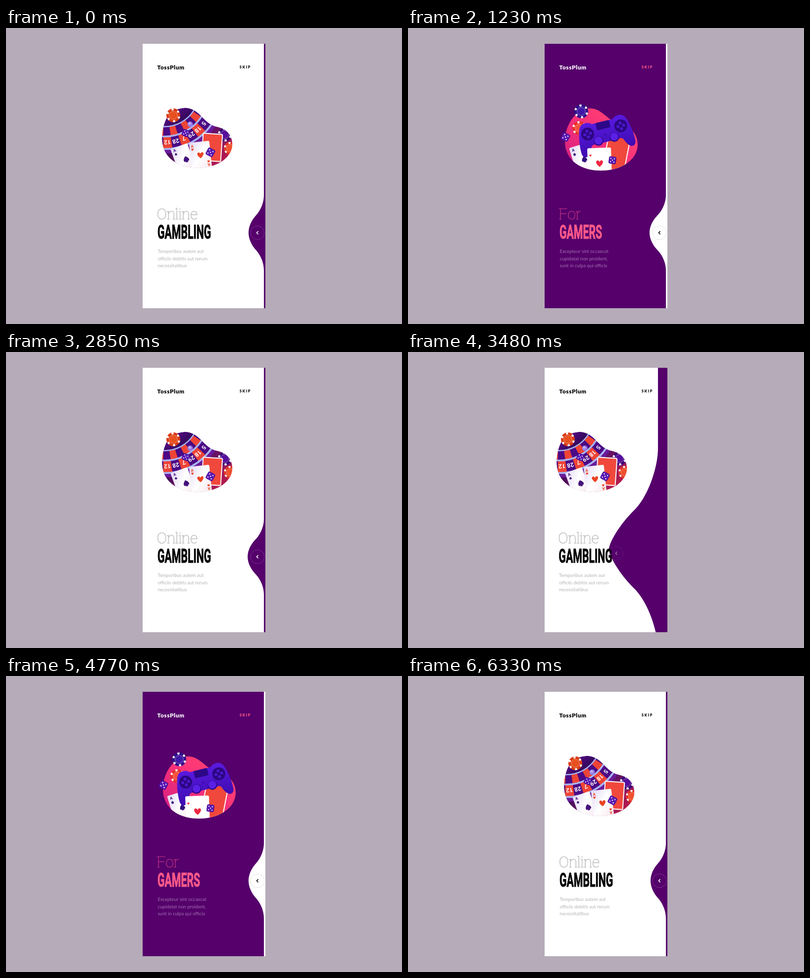
Animation, 800 px wide and 600 px high, one loop 6.36 s. Source, as an HTML page:

```html
<!DOCTYPE html>
<html lang="en">
<head>
<meta charset="utf-8">
<title>Onboarding swipe</title>
<style>
  html, body { margin: 0; width: 100%; height: 100%; overflow: hidden; background: #b6abb8; }
  svg { display: block; width: 800px; height: 600px; }
  .brand { font: 900 11.8px Lato, sans-serif; letter-spacing: .6px; }
  .skip { font: 900 7.2px Lato, sans-serif; letter-spacing: 1.8px; }
  .intro { font: 200 31px Roboto, sans-serif; stroke-width: .5px; }
  .title { font: 700 39.4px Roboto, sans-serif; }
  .body { font: 400 9.5px Lato, sans-serif; }
  .mark { font: 700 12px Roboto, sans-serif; text-anchor: middle; }
</style>
</head>
<body>
<svg viewBox="0 0 800 600">
  <defs>
    <clipPath id="card"><rect x="276" y="32" width="248" height="536"/></clipPath>
    <clipPath id="waveClip"><path id="waveClipPath"/></clipPath>
    <linearGradient id="night" x1="0" y1="0" x2="1" y2="1">
      <stop offset="0" stop-color="#6a0fa0"/><stop offset=".3" stop-color="#2a0650"/><stop offset=".65" stop-color="#7a1468"/><stop offset="1" stop-color="#d8203c"/>
    </linearGradient>
    <linearGradient id="rose" x1="0" y1="1" x2="1" y2="0">
      <stop offset="0" stop-color="#d01c84"/><stop offset=".55" stop-color="#fb3478"/><stop offset="1" stop-color="#ff4a70"/>
    </linearGradient>
    <linearGradient id="paper" x1="0" y1="0" x2="1" y2="1">
      <stop offset="0" stop-color="#e2d8f6"/><stop offset=".5" stop-color="#fff"/><stop offset="1" stop-color="#f6e6ee"/>
    </linearGradient>
    <linearGradient id="violet" x1="0" y1="0" x2="0" y2="1">
      <stop offset="0" stop-color="#5a1ae0"/><stop offset="1" stop-color="#3d0bb0"/>
    </linearGradient>
    <pattern id="weave" width="3" height="3" patternUnits="userSpaceOnUse">
      <rect width="3" height="3" fill="#ee3c34"/><circle cx="1.5" cy="1.5" r=".65" fill="#ff8a68"/>
    </pattern>
  </defs>
  <rect width="800" height="600" fill="#b6abb8"/>
  <g clip-path="url(#card)">
    <rect id="base" x="276" y="32" width="248" height="536"/>
    <use id="oldArt"/>
    <path id="wave"/>
    <g clip-path="url(#waveClip)"><use id="newArt"/></g>
    <path id="bulge"/>
    <g id="copy"></g>
    <text id="brand" class="brand" x="305.5" y="84"><tspan>Toss</tspan><tspan>Plum</tspan></text>
    <text id="skip" class="skip" x="472" y="82.4">SKIP</text>
    <g id="button" fill="none">
      <circle r="14"/>
      <path d="M1.6 -3.2L-1.6 0L1.6 3.2" stroke-width="1.5"/>
    </g>
  </g>
</svg>
<script>
const HALF = 1590;
const SWAP = 440;
const $ = id => document.getElementById(id);
const clamp = v => Math.max(0, Math.min(1, v));

const pages = [
  { bg: '#ffffff', ink: '#000000', skip: '#000000', title: '#000000', intro: '#b8b8b8', body: '#b4b4b4', ring: '#e4e4e4',
    words: ['Online', 'GAMBLING'], lines: ['Temporibus autem aut', 'officiis debitis aut rerum', 'necessitatibus'] },
  { bg: '#55006b', ink: '#ffffff', skip: '#ff5a8a', title: '#ff5a8a', intro: '#b92f82', body: '#a070b0', ring: '#7a3090',
    words: ['For', 'GAMERS'], lines: ['Excepteur sint occaecat', 'cupidatat non proident,', 'sunt in culpa qui officia'] }
];

// Smooth curve through [time, value] pairs, flat at turning points
function track(...keys) {
  const slope = i => (keys[i + 1][1] - keys[i][1]) / (keys[i + 1][0] - keys[i][0]);
  const tangent = i => {
    if (i === 0 || i === keys.length - 1) return 0;
    const a = slope(i - 1), b = slope(i);
    return a * b <= 0 ? 0 : 2 * a * b / (a + b);
  };
  return t => {
    if (t <= keys[0][0]) return keys[0][1];
    const i = keys.findIndex(k => k[0] > t) - 1;
    if (i < 0) return keys[keys.length - 1][1];
    const [t0, v0] = keys[i], [t1, v1] = keys[i + 1], d = t1 - t0, u = (t - t0) / d;
    return v0 + (v1 - v0) * u * u * (3 - 2 * u)
      + d * u * (1 - u) * (tangent(i) * (1 - u) - tangent(i + 1) * u);
  };
}

const motion = {
  side: track([0, 521], [120, 520], [300, 505], [380, 475], [480, 420], [570, 368], [660, 323], [740, 291], [810, 277], [860, 276]),
  tip: track([0, 490], [120, 478], [200, 455], [300, 406], [380, 335], [450, 272], [540, 260], [660, 272], [740, 282], [810, 283], [950, 276]),
  spread: track([0, 76], [120, 100], [300, 205], [450, 210], [660, 188], [810, 130]),
  centerY: track([0, 415], [300, 400], [480, 404], [660, 407], [810, 395]),
  nextSide: track([480, 524.5], [660, 522.5], [860, 521]),
  nextTip: track([480, 524.5], [660, 518.5], [810, 512], [950, 497], [1080, 487.5], [1230, 488], [1500, 490]),
  nextSpread: track([480, 40], [660, 45], [810, 54], [1080, 76]),
  oldX: track([0, 0], [120, -2], [300, -15], [450, -80], [560, -180], [640, -240]),
  newX: track([360, 240], [520, 130], [660, 48], [760, 10], [810, .5], [900, 0]),
  newScale: track([360, .76], [520, .82], [660, .91], [810, 1.05], [1000, 1.02], [1230, 1]),
  textX: track([0, 0], [120, 0], [300, -1.5], [440, -12], [560, -9], [660, -4], [810, -.3], [900, 0])
};

function wavePath(side, tip, cy, spread) {
  const s = clamp((spread - 76) / 112);
  const mid = .47 - .09 * s, blunt = .17 - .11 * s, steep = .335 - .1 * s;
  const pt = (f, k) => `${(side + (tip - side) * f).toFixed(2)} ${(cy + k * spread).toFixed(2)}`;
  return `M530 0H${side}L${pt(0, -1)}`
    + `C${pt(0, -.8)} ${pt(.22, -mid - .125)} ${pt(.5, -mid)}C${pt(.8, -steep)} ${pt(1, -blunt)} ${pt(1, 0)}`
    + `C${pt(1, blunt)} ${pt(.8, steep)} ${pt(.5, mid)}C${pt(.22, mid + .125)} ${pt(0, .8)} ${pt(0, 1)}`
    + `L${side} ${Math.max(600, cy + spread)}H530Z`;
}

function mix(a, b, k) {
  const part = (c, i) => parseInt(c.slice(1 + 2 * i, 3 + 2 * i), 16);
  return `rgb(${[0, 1, 2].map(i => Math.round(part(a, i) + (part(b, i) - part(a, i)) * k))})`;
}

// Artwork pieces
const at = (x, y, r, inner) => `<g transform="translate(${x} ${y}) rotate(${r})">${inner}</g>`;
const circle = (x, y, r, fill, more = '') => `<circle cx="${x}" cy="${y}" r="${r}" fill="${fill}" ${more}/>`;
const HEART = 'M0 6C-8 0 -7.5 -6 -3.3 -6Q-1 -6 0 -3Q1 -6 3.3 -6C7.5 -6 8 0 0 6Z';
const heart = (x, y, k, fill) => `<path d="${HEART}" fill="${fill}" transform="translate(${x} ${y}) scale(${k})"/>`;
const spade = (x, y, k, fill) => `<g transform="translate(${x} ${y}) scale(${k})" fill="${fill}"><path d="${HEART}" transform="scale(1 -1)"/><path d="M0 1L3 8H-3Z"/></g>`;

function chip(x, y, r, fill, core) {
  return at(x, y, 12, circle(0, 0, r, fill)
    + circle(0, 0, r * .86, 'none', `stroke="#fff" stroke-width="${r * .28}" pathLength="18" stroke-dasharray="1 2"`)
    + circle(0, 0, r * .62, core)
    + circle(0, 0, r * .58, 'none', 'stroke="#ffd9d0" stroke-width=".9" pathLength="32" stroke-dasharray="1 1"'));
}

function die(x, y, size, angle) {
  const h = size / 2, d = size / 4;
  const dots = [[-d, -d], [d, d], [0, 0], [d, -d], [-d, d]].map(([a, b]) => circle(a, b, size * .08, '#fff')).join('');
  return at(x, y, angle, `<rect x="${-h}" y="${-h}" width="${size}" height="${size}" rx="2.5" fill="#5a18b4" stroke="#3d0a88" stroke-width=".8"/>${dots}`);
}

const card = (x, y, w, h, angle, inner = '', fill = 'url(#paper)') =>
  at(x, y, angle, `<rect x="${-w / 2}" y="${-h / 2}" width="${w}" height="${h}" rx="2.5" fill="${fill}"/>${inner}`);
const cardBack = (x, y, w, h, angle) => card(x, y, w, h, angle,
  `<rect x="${2 - w / 2}" y="${2 - h / 2}" width="${w - 4}" height="${h - 4}" fill="url(#weave)"/>`, '#fff');
const letterA = (x, y, fill, turn = 0) => `<g transform="translate(${x} ${y}) rotate(${turn})"><text class="mark" style="font-size:8px" fill="${fill}">A</text></g>`;

function wheel() {
  const cx = 320, cy = 130, rad = Math.PI / 180;
  const arc = (r, a, b, color, width) => {
    const p = d => `${cx + r * Math.sin(d * rad)} ${cy + r * Math.cos(d * rad)}`;
    return `<path d="M${p(a)}A${r} ${r} 0 0 0 ${p(b)}" fill="none" stroke="${color}" stroke-width="${width}"/>`;
  };
  let out = '';
  ['', '12', '28', '7', '29', '18', '5', '', ''].forEach((label, i) => {
    const a = 3.4 + 9.6 * (i - 1), red = '#ee4436', dark = '#4c0a86';
    out += arc(103, a - 4.8, a + 4.8, i % 2 ? red : dark, 24);
    out += arc(80, a - 4.8, a + 4.8, i % 2 ? dark : red, 18);
    out += at(cx + 102 * Math.sin(a * rad), cy + 102 * Math.cos(a * rad), 180 - a,
      `<text class="mark" y="4.3" fill="#fff">${label}</text>`);
  });
  return out + [[70, 2.5], [90, 3.5], [115.5, 4]].map(([r, w]) => arc(r, -30, 85, '#a9b4f4', w)).join('')
    + arc(121, -30, 85, '#6a1a9c', 7);
}

function casino() {
  const red = '#ea4424', blob = 'M316 212C319 190 326 165 360 162C390 160 398 194 425 200C448 204 459 222 457 238C455 262 430 283 388 284C345 283 310 262 316 212Z';
  return `<clipPath id="bean"><path d="${blob}"/></clipPath><g clip-path="url(#bean)">
    <path d="${blob}" fill="url(#night)"/>${wheel()}
    ${circle(372, 195, 5.5, '#9a7ce8')}${circle(371, 193.5, 2.5, '#c3b2fa')}${die(363, 213, 13, 22)}
    ${chip(442, 216, 14, '#3c0a78', '#54109c')}${chip(453, 244, 13, '#e2382a', '#f0502c')}
    ${cardBack(416, 242, 41, 57, 4)}
    ${card(358, 264, 36, 52, -20, letterA(-11, -18, '#43107c') + spade(-11, -13, .38, '#43107c') + spade(5, 3, .9, '#43107c'))}
    ${card(393, 258, 41, 55, -6, letterA(-15, -17, red) + heart(-15, -13, .38, red) + heart(0, 0, 1, red) + letterA(15, 18, red, 180) + heart(15, 14, .38, red))}
    </g>${die(413, 252, 15, 28)}${chip(338, 177, 14, '#d83c16', '#e85020')}`;
}

function gamepad() {
  const side = `<path d="M-1 -24H22Q26 -30 38 -29Q48 -27 51 -12Q57 10 56 30Q54 41 45 38Q38 34 33 20Q28 15 23 19Q16 25 9 18H-1Z" fill="url(#violet)"/>`;
  const pad = x => at(x, -6.6, 0, circle(0, 0, 13, '#2b0780')
    + [0, 90, 180, 270].map(a => `<g transform="rotate(${a})">${circle(0, -6, 3.1, '#4c16cc')}</g>`).join(''));
  const stick = x => circle(x, 12.5, 9.5, '#2e078c') + circle(x, 11.5, 8, '#5a20e6');
  return at(398, 213, -14, side + `<g transform="scale(-1 1)">${side}</g>`
    + '<rect x="-14" y="-24" width="28" height="15" rx="2" fill="#2c0888"/>'
    + pad(-34.5) + pad(34.5) + stick(-16.5) + stick(16.5) + circle(0, 3, 1.5, '#2c0888'));
}

function gamer() {
  const blob = 'M317 230C317 195 340 163 368 163C392 163 402 187 425 193C450 200 464 215 464 236C464 268 430 289 390 289C345 289 317 265 317 230Z';
  return `<clipPath id="pebble"><path d="${blob}"/></clipPath><path d="${blob}" fill="url(#rose)"/>
    ${chip(346, 203, 14, '#e8302c', '#f8503c')}
    <g clip-path="url(#pebble)">${cardBack(421, 254, 46, 72, 11)}
    ${card(351, 266, 36, 58, -17, letterA(-11, -20, '#32107c') + spade(-11, -14, .42, '#32107c') + spade(5, 1, .85, '#32107c'))}</g>
    ${gamepad()}
    <g clip-path="url(#pebble)">${card(387, 272, 48, 58, -2, heart(-18, -14, .35, '#ee2840') + heart(0, 3, 1.1, '#ee2840'), '#fff')}</g>
    ${die(413, 268, 14, 8)}${die(318, 221, 15, 28)}${chip(350, 169, 14, '#30108c', '#4018a8')}`;
}

document.querySelector('defs').insertAdjacentHTML('beforeend', `<g id="art0">${casino()}</g><g id="art1">${gamer()}</g>`);
const artCenter = [[386, 222], [390, 222]];

// Thin slab serifs at the stems of the intro word
function serifs(text) {
  const stems = { n: [.17, .83], l: [.5], i: [.5], r: [.26], F: [.19] };
  const tops = { l: 23, F: 22 };
  let d = '';
  [...text.textContent].forEach((ch, i) => {
    const x0 = text.getStartPositionOfChar(i).x, w = text.getEndPositionOfChar(i).x - x0;
    (stems[ch] || []).forEach((f, j) => {
      const x = x0 + f * w;
      d += `M${x - 2.6} 387.5h5.2`;
      if (!j) d += `M${x - 3} ${388.4 - (tops[ch] || 16)}h3`;
    });
  });
  text.insertAdjacentHTML('afterend', `<path d="${d}" fill="none" stroke="currentColor" stroke-width="1.2"/>`);
}

const copies = pages.map(page => {
  const g = document.createElementNS('http://www.w3.org/2000/svg', 'g');
  const body = page.lines.map((line, i) => `<text class="body" x="306.5" y="${456 + 14.5 * i}">`
    + line.split(' ').map(w => `<tspan>${w}</tspan>`).join(' ') + '</text>').join('');
  g.innerHTML = `<g style="color:${page.intro}"><text class="intro" x="304.5" y="388" fill="currentColor" stroke="currentColor">${page.words[0]}</text></g>
    <g transform="translate(306 427) scale(.54 1)"><text class="title" fill="${page.title}" stroke="${page.title}" stroke-width=".9">${page.words[1]}</text></g>${body}`;
  $('copy').append(g);
  serifs(g.querySelector('.intro'));
  return { g, words: [...g.querySelectorAll('tspan')] };
});

const set = (el, attrs) => { for (const k in attrs) el.setAttribute(k, attrs[k]); };

function draw(time) {
  const p = time % HALF, now = Math.floor(time / HALF) % 2, next = 1 - now;
  const from = pages[now], to = pages[next];
  const m = {};
  for (const k in motion) m[k] = motion[k](p);

  const wave = wavePath(m.side, m.tip, m.centerY, m.spread);
  set($('base'), { fill: from.bg });
  set($('wave'), { d: wave, fill: to.bg });
  set($('waveClipPath'), { d: wave });
  set($('bulge'), { d: wavePath(m.nextSide, m.nextTip, 415, m.nextSpread), fill: from.bg });

  const [cx, cy] = artCenter[next];
  set($('oldArt'), { href: '#art' + now, transform: `translate(${m.oldX} 0)` });
  set($('newArt'), { href: '#art' + next, opacity: p < 360 ? 0 : 1,
    transform: `translate(${cx + m.newX} ${cy}) scale(${m.newScale}) translate(${-cx} ${-cy})` });

  copies.forEach(({ g, words }, i) => {
    const incoming = i === next;
    const opacity = incoming ? clamp((p - SWAP) / 80) : clamp((SWAP - p) / 60);
    set(g, { opacity, transform: `translate(${m.textX} 0)` });
    words.forEach((w, j) => {
      const k = incoming ? clamp((p - 480 - 30 * j) / 30) : 1;
      set(w, { fill: mix(pages[i].ink, pages[i].body, k) });
    });
  });
  [...$('brand').children].forEach((part, i) => set(part, { fill: mix(from.ink, to.ink, clamp((p - 560 - 60 * i) / 80)) }));
  set($('skip'), { fill: mix(from.skip, to.skip, clamp((p - 520) / 100)) });

  const early = p < 600, host = early ? to : from;
  const x = early ? m.tip + 18 - 3 * clamp(p / 300) : m.nextTip + 20 - 2 * clamp((p - 1230) / 270);
  const y = early ? 415 - 7 * clamp(p / 300) : 415;
  const opacity = early ? 1 - clamp((p - 130) / 290) : clamp((p - 900) / 220);
  set($('button'), { transform: `translate(${x} ${y})`, opacity });
  set($('button').children[0], { stroke: host.ring });
  set($('button').children[1], { stroke: host.ink });
}

let start;
function tick(now) {
  start ??= now;
  draw((now - start) % (4 * HALF));
  requestAnimationFrame(tick);
}
draw(0);
requestAnimationFrame(tick);
</script>
</body>
</html>
```
